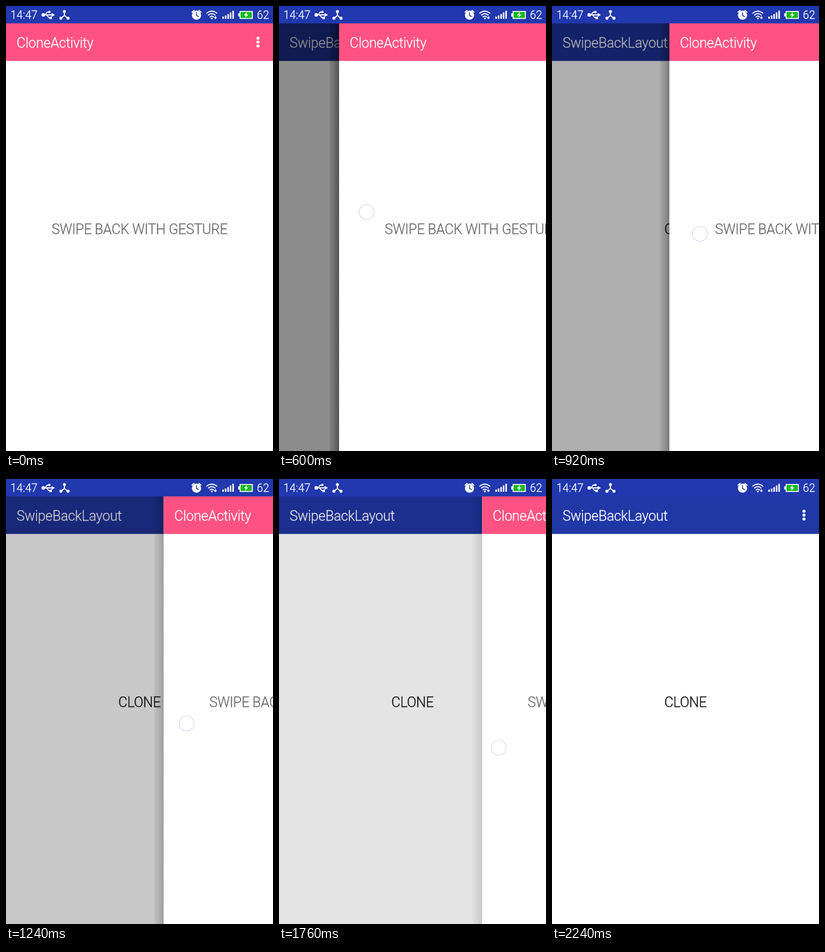
An HTML page for the animation above (2.28 s loop, 480x800 px).

```html
<!DOCTYPE html>
<html lang="en">
<head>
<meta charset="utf-8">
<title>Swipe back</title>
<style>
  html, body { margin: 0; width: 100%; height: 100%; overflow: hidden; background: #fff; }
  svg { display: block; width: 480px; height: 800px; }
  text {
    font: 300 25px Roboto, "Open Sans", sans-serif;
    letter-spacing: -.32px;
    fill: currentColor;
    stroke: currentColor;
    stroke-width: .3px;
  }
  .title { color: #fff; }
  .body { text-anchor: middle; }
  .clock { font-size: 20px; letter-spacing: 0; color: #fff; }
  .line { fill: none; stroke: #fff; stroke-linecap: round; stroke-linejoin: round; }
</style>
</head>
<body>
<svg viewBox="0 0 480 800">
  <defs>
    <linearGradient id="shade">
      <stop offset="0" stop-opacity=".1"/>
      <stop offset=".5" stop-opacity=".28"/>
      <stop offset="1" stop-opacity=".55"/>
    </linearGradient>
    <g id="menu" fill="#fff">
      <circle cx="453" cy="58" r="2.8"/>
      <circle cx="453" cy="65" r="2.8"/>
      <circle cx="453" cy="72" r="2.8"/>
    </g>
  </defs>

  <g id="back">
    <rect width="480" height="800" fill="#fff"/>
    <rect y="31" width="480" height="67.75" fill="#2037a6"/>
    <rect id="barShade" y="31" width="480" height="67.75"/>
    <text class="title" x="19" y="75">SwipeBackLayout</text>
    <use href="#menu"/>
    <text class="body" x="240" y="410" color="#111">CLONE</text>
  </g>
  <rect id="scrim" y="31" width="480" height="769"/>

  <g id="front">
    <rect id="shadow" x="-17" y="31" width="17" height="769" fill="url(#shade)"/>
    <rect width="480" height="800" fill="#fff"/>
    <rect y="31" width="480" height="67.75" fill="#ff5283"/>
    <text class="title" x="19" y="75">CloneActivity</text>
    <use href="#menu"/>
    <text class="body" x="240" y="410" color="#6b6b6b">SWIPE BACK WITH GESTURE</text>
  </g>
  <circle id="touch" r="13.5" fill="#fff" stroke="#d3d7f3" stroke-width="1.2"/>

  <g id="status">
    <rect width="480" height="31.25" fill="#2138ae"/>
    <text class="clock" x="8" y="23">14:47</text>
    <!-- USB -->
    <g class="line" stroke-width="1.8">
      <path d="M66 16H84M70 16L74 11H77M73 16L77 21H80"/>
      <g fill="#fff" stroke="none">
        <circle cx="67" cy="16" r="3.2"/>
        <path d="M82 12.5L88 16L82 19.5Z"/>
        <circle cx="78" cy="10.8" r="2.2"/>
        <rect x="78" y="19" width="4.5" height="4.5"/>
      </g>
    </g>
    <!-- Hub -->
    <g class="line" stroke-width="2">
      <path d="M105 10V17L99 22M105 17L111 22"/>
      <g fill="#fff" stroke="none">
        <circle cx="105" cy="10" r="2.7"/>
        <circle cx="98.7" cy="22" r="2.7"/>
        <circle cx="111.5" cy="22" r="2.7"/>
      </g>
    </g>
    <!-- Alarm -->
    <circle cx="342.5" cy="16.5" r="8.3" fill="#fff"/>
    <path class="line" stroke-width="2" d="M334.5 11L338 8M350.5 11L347 8"/>
    <path class="line" style="stroke:#2138ae" stroke-width="1.6" d="M342.5 12V17L346 19"/>
    <!-- Wi-Fi -->
    <path class="line" stroke-width="2" d="M361 12.8Q370 5.6 379 12.8M364 16.2Q370 11.2 376 16.2M367 19.5Q370 17 373 19.5"/>
    <circle cx="370" cy="22.3" r="1.6" fill="#fff"/>
    <path d="M376.5 18.3L379 21L376.5 23.7L374 21Z" fill="#fff"/>
    <!-- Signal -->
    <path class="line" style="stroke-linecap:butt" stroke-width="2.7" d="M390.3 23V19M394.8 23V17M399.3 23V14.5M403.8 23V11.5M408.3 23V8.5"/>
    <!-- Battery -->
    <rect x="420.8" y="9.8" width="22" height="12.6" fill="#14b81c" stroke="#fff" stroke-width="1.7"/>
    <rect x="417.5" y="13" width="2.6" height="6" fill="#fff"/>
    <path d="M433 11L427.5 16.8H431L430 21L436 15.2H432.4Z" fill="#fff"/>
    <text class="clock" x="451" y="23">62</text>
  </g>
</svg>
<script>
  const LOOP = 2280, STEP = 40, TOUCH_START = 40, TOUCH_END = 1900;
  const slide = [[0, 0], [80, 2], [360, 60], [600, 108], [920, 211], [1240, 283.5],
                 [1760, 365.2], [1880, 382], [1960, 404], [2080, 455], [2200, 480]];
  const touchX = [[40, 20], [360, 98], [600, 157.5], [920, 266], [1240, 325], [1760, 395], [1900, 411]];
  const touchY = [[40, 351], [360, 359], [600, 370.5], [920, 409.5], [1240, 439.5], [1760, 483], [1900, 493]];
  const $ = id => document.getElementById(id);

  // Monotone cubic through [time, value] points.
  function curve(points, t) {
    const last = points.length - 1;
    if (t <= points[0][0]) return points[0][1];
    if (t >= points[last][0]) return points[last][1];
    const slope = i => (points[i + 1][1] - points[i][1]) / (points[i + 1][0] - points[i][0]);
    const tangent = i => {
      if (i === 0) return slope(0);
      if (i === last) return slope(last - 1);
      const a = slope(i - 1), b = slope(i);
      return a * b > 0 ? 2 * a * b / (a + b) : 0;
    };
    let i = 0;
    while (t > points[i + 1][0]) i++;
    const [t0, v0] = points[i], [t1, v1] = points[i + 1];
    const span = t1 - t0, u = (t - t0) / span, w = 1 - u;
    return v0 * (1 + 2 * u) * w * w + v1 * u * u * (3 - 2 * u)
      + span * u * w * (tangent(i) * w - tangent(i + 1) * u);
  }

  function draw(time) {
    const t = Math.floor(time % LOOP / STEP) * STEP;
    const x = curve(slide, t), covered = 1 - x / 480;
    $("front").setAttribute("transform", `translate(${x.toFixed(1)} 0)`);
    $("shadow").setAttribute("opacity", covered);
    $("barShade").setAttribute("opacity", 0.15 * covered);
    $("scrim").setAttribute("opacity", Math.max(0, 0.597 - 0.00134 * x));
    $("touch").setAttribute("cx", curve(touchX, t));
    $("touch").setAttribute("cy", curve(touchY, t));
    $("touch").setAttribute("visibility", t >= TOUCH_START && t <= TOUCH_END ? "visible" : "hidden");
  }

  let start;
  function tick(now) {
    start ??= now;
    draw(Math.max(0, now - start));
    requestAnimationFrame(tick);
  }
  draw(0);
  requestAnimationFrame(tick);
</script>
</body>
</html>
```
